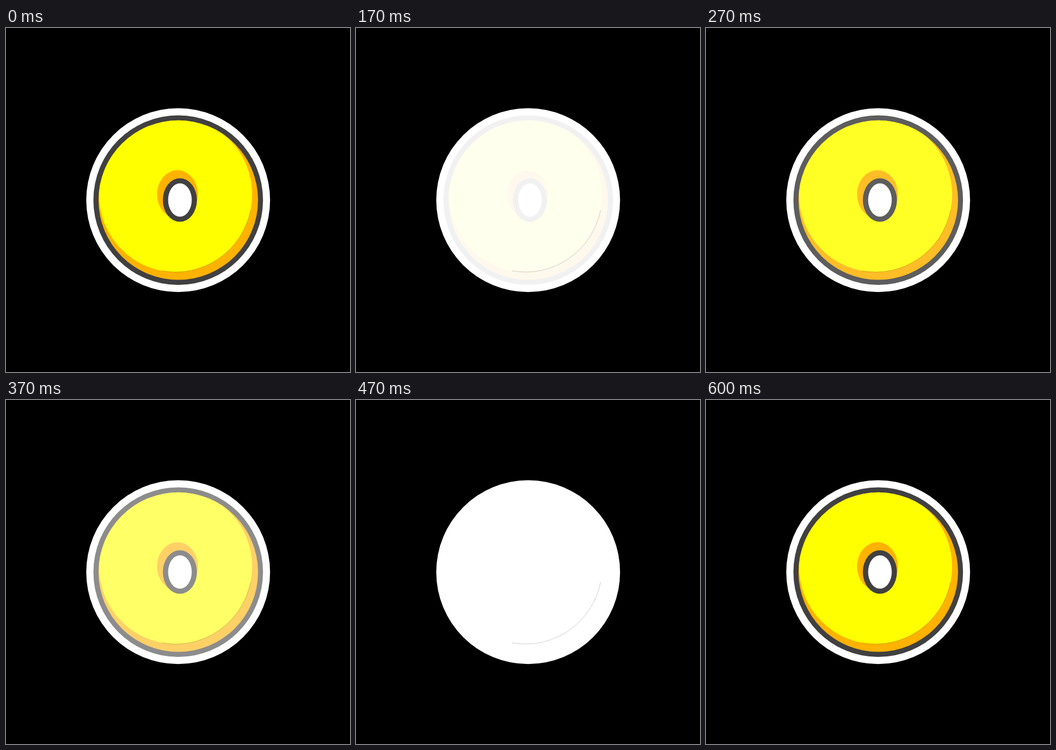
An HTML page for the animation above (2430 ms loop, 640 by 640 pixels).

```html
<!DOCTYPE html>
<html lang="en">
<head>
<meta charset="utf-8">
<title>Flashing ring</title>
<style>
  html, body { margin: 0; width: 100%; height: 100%; overflow: hidden; background: #000; }
  svg { display: block; width: 100%; height: 100%; }
  .dark { fill: #404040; }
  .shade { fill: #ffb200; }
  .light { fill: #ff0; }
  .white { fill: #fff; }

  /* Two white flashes within 600 ms, then rest */
  .flash { fill: #fff; opacity: 0; animation: flash 2430ms step-end infinite; }
  @keyframes flash {
    0% { opacity: 0; }
    1.2346% { opacity: .2; }
    2.8807% { opacity: .54; }
    5.3498% { opacity: 1; }
    6.9959% { opacity: .93; }
    8.2305% { opacity: .69; }
    9.465% { opacity: .4; }
    11.1111% { opacity: .15; }
    15.2263% { opacity: .4; }
    16.4609% { opacity: .69; }
    17.6955% { opacity: .93; }
    19.3416% { opacity: 1; }
    21.8107% { opacity: .54; }
    23.4568% { opacity: .2; }
    24.6914%, 100% { opacity: 0; }
  }
</style>
</head>
<body>
<svg viewBox="0 0 640 640">
  <clipPath id="face"><circle cx="320.5" cy="320.2" r="148.4"/></clipPath>
  <circle class="white" cx="320.3" cy="320.3" r="171"/>
  <circle class="dark" cx="320.4" cy="320.2" r="157.8"/>
  <g clip-path="url(#face)">
    <circle class="shade" cx="320.5" cy="320.2" r="150"/>
    <ellipse class="light" cx="315.5" cy="310" rx="142.5" ry="144"/>
  </g>
  <ellipse class="shade" cx="319" cy="309.5" rx="38" ry="45"/>
  <ellipse class="dark" cx="323.5" cy="320" rx="31.7" ry="40.5"/>
  <ellipse class="white" cx="323.6" cy="320" rx="22" ry="31"/>
  <circle class="flash" cx="320.4" cy="320.2" r="159"/>
  <!-- hairline seam along the lower edge -->
  <path d="M455 339.4A142.5 144 0 0 1 290 451.7" fill="none" stroke="#000" stroke-width=".4" opacity=".5"/>
</svg>
</body>
</html>
```
